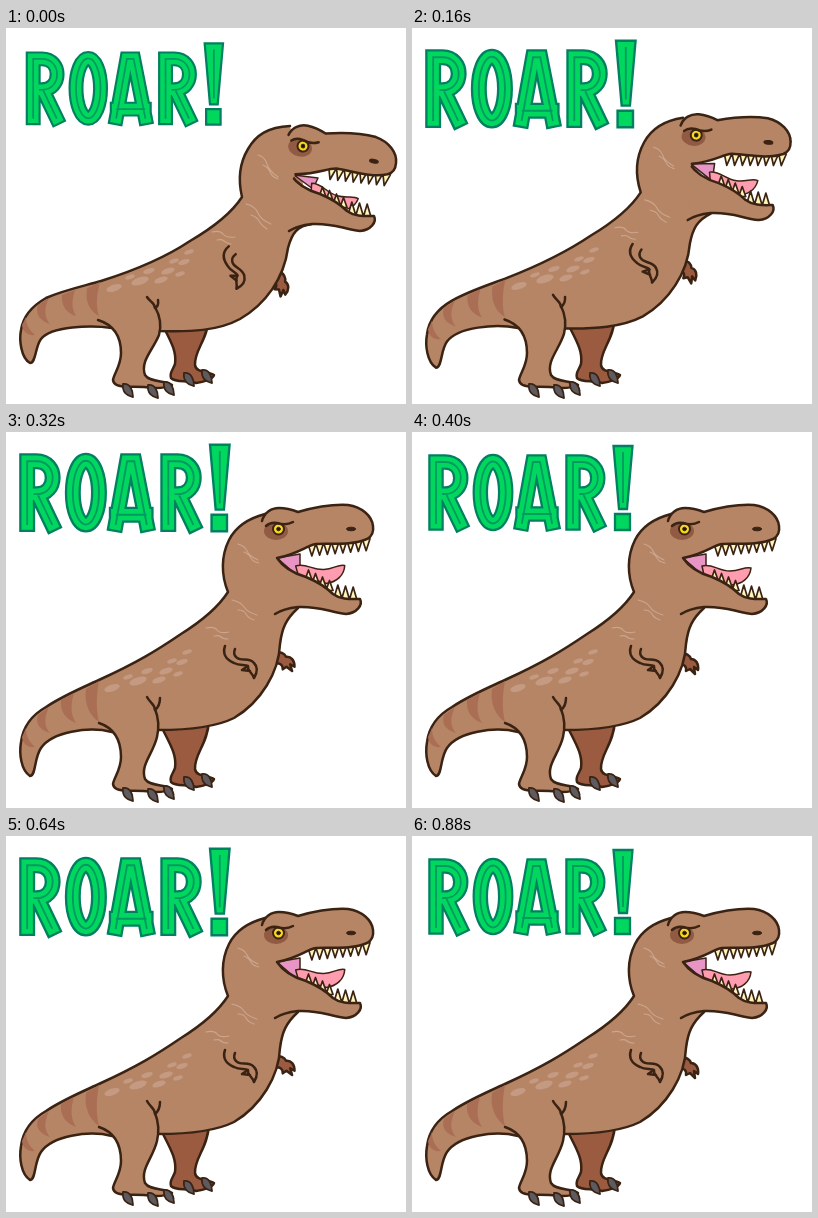
Write an HTML page that moves like this. It is 400x376 px and loops after 960 ms.

```html
<!DOCTYPE html>
<html lang="en">
<meta charset="utf-8">
<title>Roar!</title>
<style>
  html, body { margin: 0; height: 100%; overflow: hidden; background: #fff; }
  svg { display: block; width: 400px; height: 376px; }
  .line { stroke: #3b2314; stroke-width: 2.5; stroke-linecap: round; stroke-linejoin: round; }
  .skin { fill: #b58565; }
  .far { fill: #9b5b41; }
  .none { fill: none; }
  .teeth { fill: #fff6b8; stroke-width: 1.7; }
  .claw { fill: #5d5b5f; stroke-width: 1.8; }
  .stripe { fill: #aa6e54; }
  .mark { fill: none; stroke: #cda58d; stroke-width: 1.1; stroke-linecap: round; }
  #word { fill: none; stroke-linecap: square; }
</style>
<svg viewBox="0 0 400 376">
  <defs>
    <g id="letters">
      <path id="r" d="M24 30V91M24 30H33C54 30 54 62 33 62H31M35 64L48 91"/>
      <use href="#r" x="137"/>
      <ellipse cx="81" cy="60.500" rx="12.700" ry="31"/>
      <path d="M110 91L121 30H128L140 91M111 82H139"/>
    </g>
    <path id="claw" d="M0 0C7-1 10 6 10 13C4 12-1 8 0 0Z"/>
  </defs>

  <g id="word" role="img" aria-label="ROAR!">
    <use href="#letters" stroke="#008060" stroke-width="15.500"/>
    <use href="#letters" stroke="#00d75f" stroke-width="11"/>
    <use href="#letters" stroke="#009a60" stroke-width="1.800"/>
    <g fill="#00d75f" stroke="#008060" stroke-width="2.300">
      <path d="M201.500 14H220.500L215 77H207Z"/>
      <path d="M203 82H218V98H203Z"/>
      <path d="M211 21V70" stroke="#009a60" stroke-width="1.800"/>
    </g>
  </g>

  <g class="line">
    <path id="farArm" class="far" d="M268 222C274 220 278 224 279 227C284 227 287 232 286 238L282 235L283 242L278 237L274 239C275 234 271 232 268 232Z"/>
    <path class="far" d="M156 296C164 312 171 323 169 336C167 342 163 345 165 350C170 355 180 352 190 355C198 354 207 351 208 347C202 343 190 345 189 337C188 322 202 312 203 288"/>
    <use href="#claw" class="claw" x="178" y="345"/>
    <use href="#claw" class="claw" x="196" y="342"/>
    <path class="skin" d="M292 176C280 187 276 196 274 212C273 240 255 270 228 286C208 296 180 298 152 298L106 300C82 294 46 300 35 316C28 326 30 344 24 344C15 338 13 322 15 310C17 294 26 283 40 275C58 263 78 255 95 247C130 231 150 219 175 202C199 187 213 174 222 160C215 143 215 124 223 108C229 96 240 87 259 82"
      data-rest="M306 196C291 198 286 205 282 220C278 250 260 276 234 291C212 303 184 304 154 303L106 300C85 297 45 298 35 311C29 319 30 335 24 335C15 330 13 312 15 302C17 288 26 278 40 270C58 262 78 258 95 253C130 242 160 229 184 213C208 199 225 186 236 169C232 152 233 136 242 121C250 107 262 99 284 98"/>
  </g>

  <path class="stripe" d="M80 257L93 249C90 264 90 278 93 290C83 283 78 271 80 257ZM55 268L68 261C64 274 65 283 70 291C59 287 54 279 55 268ZM32 283L43 275C37 288 39 295 44 301C34 298 29 292 32 283ZM16 305L20 296C20 304 23 310 29 315C22 316 17 312 16 305Z"
    data-rest="M81 260L94 254C90 268 90 280 93 288C83 283 79 273 81 260ZM56 267L69 262C65 274 66 281 70 288C60 285 55 277 56 267ZM32 277L43 270C37 282 39 290 44 296C34 293 29 286 32 277ZM16 297L20 289C20 296 23 302 29 307C22 308 17 304 16 297Z"/>
  <g id="spots" fill="#c49a82"></g>

  <g class="line">
    <path class="skin" d="M93 291C108 296 115 308 115 325C115 338 108 345 107 352C108 358 114 358 119 359C130 358 140 359 150 360C158 360 164 358 166 357C160 352 144 355 139 347C134 333 147 322 151 305C154 292 151 282 149 277"
      data-rest="M92 292C108 297 115 309 115 325C115 338 108 345 107 352C108 358 114 358 119 359C130 358 140 359 150 360C158 360 164 358 166 357C160 352 144 355 139 347C134 333 147 322 153 307C156 296 153 286 149 279"/>
    <path class="none" d="M141 265C144 271 149 272 149 278Q154 274 154 266"
      data-rest="M141 269C144 274 149 275 149 280Q153 278 152 272"/>
    <use href="#claw" class="claw" x="117" y="356"/>
    <use href="#claw" class="claw" x="142" y="357"/>
    <use href="#claw" class="claw" x="158" y="354"/>
    <path id="arm" class="none" d="M219 214C216 223 221 228 228 231C234 234 239 232 242 234C241 239 246 240 248 246C251 241 252 235 248 231C243 225 234 230 230 225Q227 222 229 217M242 234L236 238L244 239"/>
    <path fill="#e795c5" stroke-width="1.500" d="M271 126L294 122L294 146Z" data-rest="M288 147L312 150L307 161Z"/>
    <g id="jaw">
      <path id="tongue" fill="#ff9caf" stroke-width="1.500" d="M290 134C300 131 306 139 318 139C328 139 333 134 339 136C338 146 330 152 320 153L292 143Z"/>
      <path id="lowerTeeth" class="teeth"/>
      <path class="skin" d="M271 126C277 135 286 141 300 145C312 150 320 155 327 162C335 168 345 167 354 167C357 173 351 181 340 182C322 180 315 174 292 175C283 176 275 178 269 182"/>
    </g>
    <g id="head">
      <path class="skin" stroke="none" d="M256 85L274 84L271 126L262 150L240 120Z"/>
      <path id="upperTeeth" class="teeth"/>
      <path class="skin" d="M256 89C258 81 265 76 273 76C281 76 287 78 292 80C306 76 325 72 342 73C356 75 366 84 367 94C368 101 365 105 361 107C345 114 325 111 310 112C299 114 295 121 271 126"/>
      <ellipse cx="270" cy="99" rx="12" ry="9" fill="#915a43" stroke="none"/>
      <circle cx="272.500" cy="97" r="5.500" fill="#f6d820" stroke-width="2"/>
      <circle cx="272.500" cy="97" r="1.800" fill="#20130c" stroke-width="1"/>
      <path class="none" d="M260 94Q264 90 271 91Q280 94 287 90"/>
      <ellipse cx="345" cy="97" rx="4.500" ry="1.800" fill="#3b2314" stroke-width="1"/>
    </g>
  </g>
  <path class="mark" d="M232 112q7 2 9 7t11 9M238 120q5 2 7 6t8 5M226 168q9 2 12 7t13 8M232 178q6 0 8 4t8 6M200 196q8-2 11 2t12 2M208 204q5-1 7 1t7 2"
    data-rest="M252 127q7 2 9 9t11 13M257 137q5 2 7 7t8 7M240 176q9 2 12 9t13 11M245 187q6 2 8 6t8 8M206 204q8-2 11 2t12 3M211 212q5-1 7 1t7 3"/>
</svg>
<script>
  const LOOP = 960, STEP = 80;
  const el = id => document.getElementById(id);
  const place = (id, value) => el(id).setAttribute('transform', value);
  const numbers = /-?\d+(\.\d+)?/g;

  function teeth(x, y, x2, y2, count, height) {
    const w = (x2 - x) / count, drop = (y2 - y) / count;
    return Array.from({ length: count }, (_, i) =>
      `M${x + i * w} ${y + i * drop}l${w / 2} ${height}l${w / 2} ${-height}z`).join('');
  }
  el('upperTeeth').setAttribute('d', teeth(302, 112, 364, 106, 8, 12));
  el('lowerTeeth').setAttribute('d',
    teeth(299, 148, 327, 162, 4, -10) + teeth(328, 166, 351, 169, 3, -13));

  const spots = [[106, 256, 8], [132, 249, 9], [153, 248, 7], [141, 239, 6], [160, 239, 7],
    [172, 242, 5], [166, 229, 5], [176, 230, 6], [181, 220, 5], [122, 245, 5]];
  el('spots').innerHTML = spots.map(([x, y, r]) =>
    `<ellipse rx="${r}" ry="${r * .42}" transform="translate(${x} ${y}) rotate(-18)"/>`).join('');

  const morphs = [...document.querySelectorAll('[data-rest]')].map(node => ({
    node, roar: node.getAttribute('d'), rest: node.dataset.rest.match(numbers).map(Number)
  }));

  function draw(now) {
    const step = Math.floor(now % LOOP / STEP);
    const rest = [1, .75, .48][step] || 0;
    const shake = step > 3 && step % 2 === 0 ? 1 : 0;
    const scale = step === 0 ? .966 : step % 2 ? 1 : 1.03;

    for (const m of morphs) {
      let i = 0;
      m.node.setAttribute('d', m.roar.replace(numbers, n => ' ' + (+n + (m.rest[i++] - n) * rest)));
    }
    place('word', `translate(118 56) scale(${scale}) translate(-118 -56)`);
    place('head', `translate(${24.5 * rest} ${21 * rest}) rotate(${12 * rest} 272 97)`);
    place('jaw', `translate(${14 * rest} ${21 * rest})`);
    place('tongue', `rotate(${16 * rest - 3 * shake} 290 140)`);
    place('arm', `translate(${3 * rest} ${7 * rest}) rotate(${32 * rest} 224 214)`);
    place('farArm', `translate(${2 * rest + shake} ${22 * rest - shake}) rotate(${32 * rest - 8 * shake} 270 226)`);
    place('spots', `translate(${2 * rest} ${4 * rest})`);
    requestAnimationFrame(() => draw(performance.now()));
  }
  draw(0);
</script>
</html>
```
